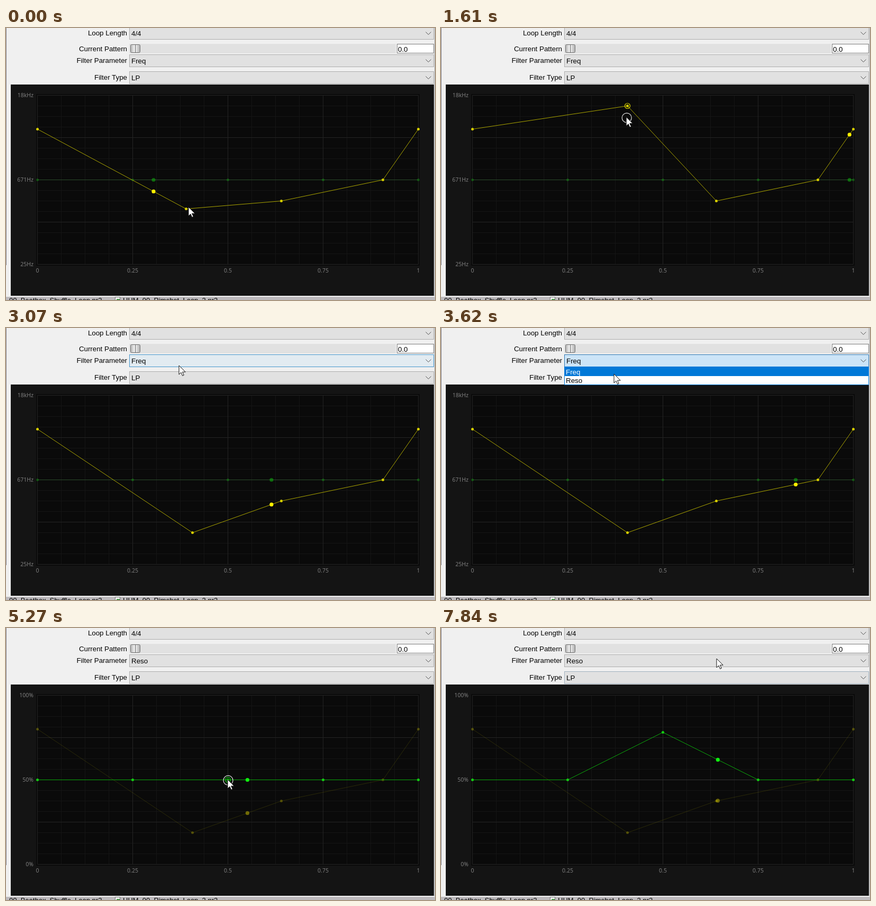
Animation, 811 px wide and 515 px high, one loop 8 s. Source, as an HTML page:

```html
<!DOCTYPE html>
<html lang="en">
<head>
<meta charset="utf-8">
<title>Filter envelope editor</title>
<style>
html, body { margin: 0; width: 100%; height: 100%; overflow: hidden; background: #f0f0f0; }
svg { display: block; width: 811px; height: 515px; }
text { font: 13.33px "Liberation Sans", Arial, sans-serif; fill: #000; white-space: pre; }
.end { text-anchor: end; }
.axis { font: 10.5px "Open Sans", "Noto Sans", sans-serif; fill: #858585; }
.mid { text-anchor: middle; }
.file { font-size: 13px; }
</style>
</head>
<body>
<svg viewBox="0 0 811 515">
  <defs>
    <linearGradient id="thumb">
      <stop offset="0" stop-color="#b4b4b4"/><stop offset=".45" stop-color="#f4f4f4"/>
      <stop offset="1" stop-color="#b0b0b0"/>
    </linearGradient>
  </defs>
  <g id="base"></g>
  <g id="live"></g>
</svg>
<script>
const LOOP = 8000, STEP = 183;
const LEFT = 59.5, TOP = 127.5, WIDTH = 720, HEIGHT = 320, MID = TOP + HEIGHT / 2, CELL = 20;
const GRAB_YELLOW = 1230, DROP_YELLOW = 2340, GRAB_GREEN = 5260, DROP_GREEN = 5820;
const HOVER = 3060, OPEN = 3420, PICK = 3700, CLOSE = 4150, SWITCH = 4530;
const $ = id => document.getElementById(id);

const rect = (x, y, w, h, fill, stroke) => stroke
  ? `<rect x="${x + .5}" y="${y + .5}" width="${w - 1}" height="${h - 1}" fill="${fill}" stroke="${stroke}"/>`
  : `<rect x="${x}" y="${y}" width="${w}" height="${h}" fill="${fill}"/>`;
const text = (x, y, s, cls = '', fill = '') =>
  `<text x="${x}" y="${y}" class="${cls}"${fill && ` style="fill:${fill}"`}>${s}</text>`;
const dot = (x, y, r, fill, opacity = 1) =>
  `<circle cx="${x}" cy="${y}" r="${r}" fill="${fill}" opacity="${opacity}"/>`;
const ring = (x, y, r, color) =>
  `<circle cx="${x}" cy="${y}" r="${r}" fill="none" stroke="${color}" stroke-width="1.2"/>`;
const path = (d, stroke, fill = 'none', opacity = 1) =>
  `<path d="${d}" stroke="${stroke}" fill="${fill}" opacity="${opacity}"/>`;

function combo(y, value, fill = '#e1e1e1', border = '#adadad') {
  return rect(233, y, 576, 24, fill, border) + text(237, y + 17, value) +
    path(`M793.5 ${y + 9.5}l5 5l5-5`, '#505050');
}

function grid() {
  let minor = '', major = '';
  for (let i = 0; i <= 16; i++) {
    const lines = `M${LEFT + i * 45} ${TOP}v${HEIGHT}M${LEFT} ${TOP + i * CELL}h${WIDTH}`;
    if (i % 4) minor += lines;
    else major += lines;
  }
  return path(minor, '#151515') + path(major, '#242424') + path(`M${LEFT} ${MID}h${WIDTH}`, '#343434');
}

$('base').innerHTML =
  rect(0, 0, 811, 515, '#f0f0f0') + rect(0, 0, 1, 449, '#83838f') + rect(810, 0, 1, 508, '#a0a0a0') +
  ['Loop Length', 'Current Pattern', 'Filter Parameter', 'Filter Type']
    .map((s, i) => text(229, [14, 44, 66, 98][i], s, 'end')).join('') +
  combo(-2, '4/4') + rect(233, 30, 504, 18, '#e1e1e1') +
  `<rect x="235.5" y="31.5" width="18" height="15" rx="2" fill="url(#thumb)" stroke="#707070"/>` +
  rect(244, 32, 1, 15, '#666') + rect(739, 30, 70, 18, '#fff', '#7a7a7a') + text(741, 45, '0.0') +
  rect(0, 509, 811, 6, '#bdbabd') +
  text(6, 519.5, '90_Beatbox_Shuffle_Loop.nr2', 'file') +
  rect(206, 509, 10, 8, '#f4f4f4', '#777') + rect(209, 513, 6, 2, '#4a9a4a') +
  text(221, 519.5, 'HHM_90_Rimshot_Loop_2.nr2', 'file') +
  rect(9, 107, 800, 400, '#141414') + rect(57, 125, 725, 325, '#0a0a0a') + grid() +
  [0, .25, .5, .75, 1].map(v => text(LEFT + v * WIDTH, 463, v, 'axis mid')).join('');

// Where the pointer rests: time, x, y. It eases from one stop to the next.
const STOPS = [
  [1060, 345, 339], [1480, 350, 145], [2160, 352, 406], [DROP_YELLOW, 352, 388],
  [3070, 327, 71], [3620, 327, 87], [4350, 333, 98], [GRAB_GREEN, 419, 287],
  [DROP_GREEN, 419, 197], [6180, 419, 130], [6730, 423, 133], [7645, 503, 95], [7830, 521, 58]
];

function pointer(t) {
  const i = STOPS.findIndex(s => s[0] > t);
  if (i < 1) return STOPS.at(i).slice(1);
  const [t0, x0, y0] = STOPS[i - 1], [t1, x1, y1] = STOPS[i];
  const f = (t - t0) / (t1 - t0), e = f * f * (3 - 2 * f);
  return [x0 + (x1 - x0) * e, y0 + (y1 - y0) * e];
}

// The yellow node snaps to the grid, one step behind the pointer.
function yellowNode(t) {
  if (t < GRAB_YELLOW) return [340.5, 342.5];
  const y = pointer(Math.min(t - STEP, DROP_YELLOW))[1];
  return [352.5, MID + Math.round((y - MID) / CELL) * CELL];
}

function greenNode(t) {
  const y = pointer(Math.min(Math.max(t, GRAB_GREEN), DROP_GREEN))[1];
  return [LEFT + WIDTH / 2, y + .5];
}

function curveY(pts, x) {
  const i = Math.max(1, pts.findIndex(p => p[0] >= x));
  const [x0, y0] = pts[i - 1], [x1, y1] = pts[i];
  return y0 + (y1 - y0) * (x - x0) / (x1 - x0);
}

function curve(pts, x, active, line, node, head) {
  return path('M' + pts.join('L'), line, 'none', active ? 1 : .2) +
    pts.map(p => dot(...p, 2.5, node, active ? 1 : .32)).join('') +
    dot(x, curveY(pts, x), 3.6, head, active ? 1 : .4);
}

function draw(t) {
  const reso = t >= SWITCH, open = t >= OPEN && t < CLOSE, hover = t >= HOVER && t < OPEN;
  const focused = t >= OPEN && t < GRAB_GREEN;
  const dragYellow = t >= GRAB_YELLOW && t < DROP_YELLOW, dragGreen = t >= GRAB_GREEN && t < DROP_GREEN;
  const [px, py] = pointer(t), yNode = yellowNode(t), gNode = greenNode(t);
  const x = LEFT + (.3048 + .0004266 * t) % 1 * WIDTH;

  const yellow = curve([[LEFT, 191.5], yNode, [520.5, 327.5], [712.5, MID], [LEFT + WIDTH, 191.5]],
    x, !reso, '#aaa400', '#d6ce00', '#fff000');
  const green = curve([0, 1, 2, 3, 4].map(i => i === 2 ? gNode : [LEFT + i * WIDTH / 4, MID]),
    x, reso, '#0aa80a', '#14cc14', '#10f010');

  let s = combo(82, 'LP', '#e1e1e1', t > 7800 ? '#9fb0be' : '#adadad') +
    combo(50, t < CLOSE ? 'Freq' : 'Reso',
      focused ? '#cce4f7' : hover ? '#e2ebf1' : '#e1e1e1',
      focused ? '#2b75b0' : hover ? '#4596cc' : '#adadad');
  (reso ? ['100%', '50%', '0%'] : ['18kHz', '671Hz', '25Hz'])
    .forEach((v, i) => s += text(52, 131 + i * 160, v, 'axis end'));
  s += reso ? yellow + green : green + yellow;

  if (dragYellow) s += ring(...yNode, 5, '#d6ce00');
  if (dragGreen) s += ring(...gNode, 5, '#14cc14');
  if (dragYellow || dragGreen) s += ring(px + 1, py + 1.5, 9, '#e8e8e8');

  if (open) {
    const row = t < PICK ? 0 : 1;
    s += rect(233, 73, 576, 35, '#fff', '#0078d7') + rect(234, 74 + row * 16, 574, 17, '#0078d7') +
      ['Freq', 'Reso'].map((v, i) => text(236, 88 + i * 16, v, '', i === row ? '#fff' : '#000')).join('');
  }
  s += path(`M${px} ${py}v17l4-3.8l2.7 6.2l2.6-1.2l-2.7-6h5.6z`, '#111', '#fff');
  $('live').innerHTML = s;
}

function captured(t) {
  const [start, step] = t < 1237 ? [0, 177] : [1240, STEP];
  return start + Math.floor((t - start + 3) / step) * step;
}

let shown = -1;
function tick(now) {
  const t = captured(now % LOOP);
  if (t !== shown) draw(shown = t);
  requestAnimationFrame(tick);
}
tick(performance.now());
</script>
</body>
</html>
```
